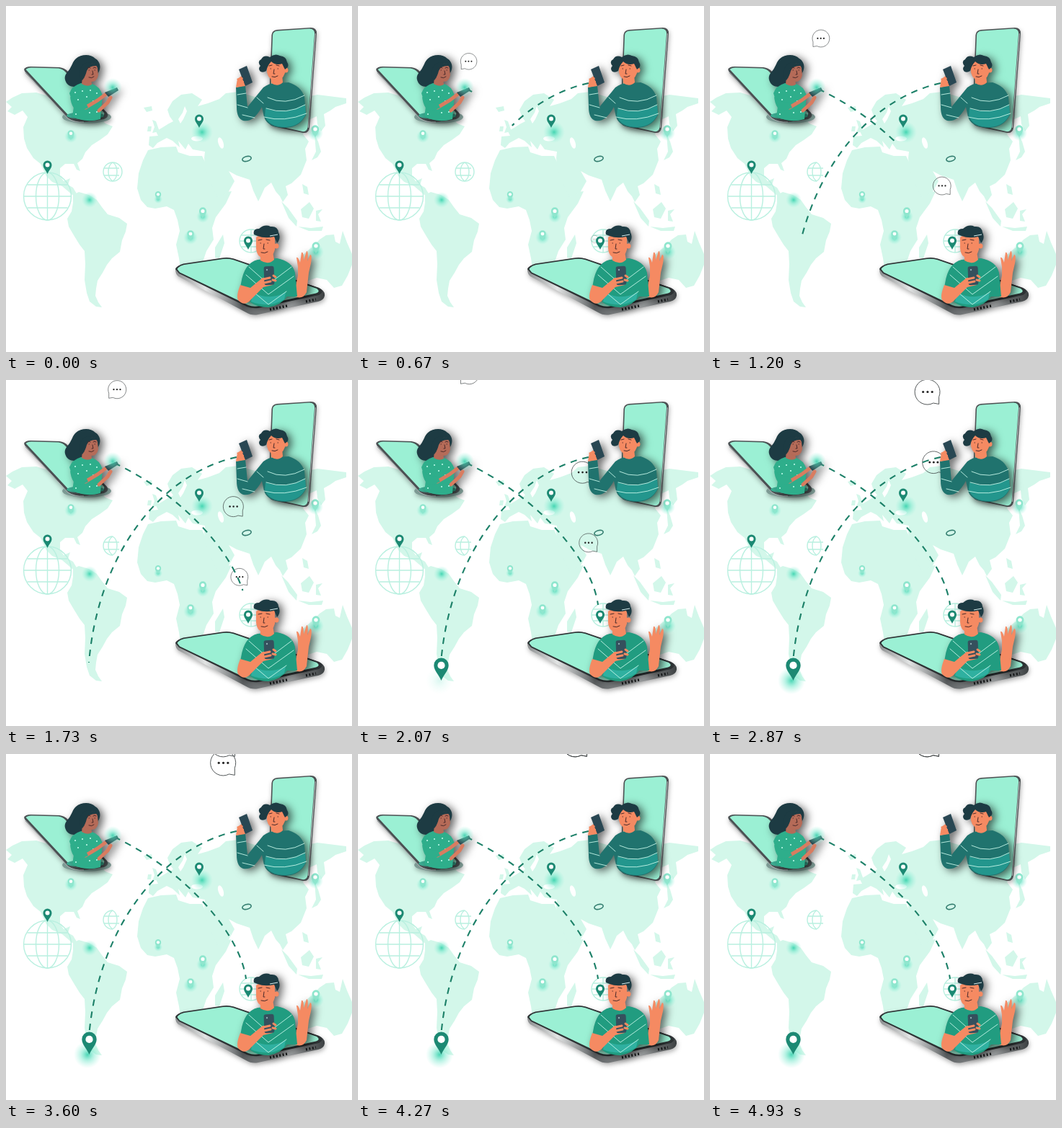
An HTML page that plays this animation: 480x480 px, repeating every 4.99 s.

```html
<!DOCTYPE html>
<html lang="en">
<head>
<meta charset="utf-8">
<title>Messages across the map</title>
<style>
html, body { margin: 0; width: 100%; height: 100%; overflow: hidden; background: #fff; }
svg { display: block; width: 100vw; height: 100vh; }
.land { fill: #d3f7ea; }
.globe { fill: none; stroke: #b9f0e0; stroke-width: 1.4; }
.dash { fill: none; stroke: #1c8068; stroke-width: 2.1; stroke-dasharray: 9 8; }
.wipe { fill: none; stroke: #fff; stroke-width: 8; stroke-dasharray: 1 1; }
.shade { filter: drop-shadow(5px 3px 6px rgba(0, 0, 0, .6)); }
.soft { filter: drop-shadow(1px 3px 3px rgba(0, 0, 0, .3)); }
.screen { fill: #9bf0d4; }
.hair { fill: #1d3b43; }
.skin { fill: #f58a62; }
.tan { fill: #b56b58; }
.line { fill: none; stroke: #c5f5e8; stroke-width: .9; stroke-linecap: round; }
.face { fill: none; stroke: #4a2a2a; stroke-width: 1; stroke-linecap: round; }
.bubble { fill: none; stroke: #3a3f40; stroke-width: .05; }
.bubble .dots { fill: #222; stroke: none; }
</style>
</head>
<body>
<svg viewBox="0 0 480 480">
<defs>
  <radialGradient id="glowFill">
    <stop offset="0" stop-color="#2bcfa8" stop-opacity=".85"/>
    <stop offset=".45" stop-color="#5fe3c3" stop-opacity=".45"/>
    <stop offset="1" stop-color="#8df0d8" stop-opacity="0"/>
  </radialGradient>
  <linearGradient id="metal">
    <stop offset="0" stop-color="#8c8f90"/><stop offset=".2" stop-color="#e2e4e4"/>
    <stop offset=".45" stop-color="#5d6163"/><stop offset=".75" stop-color="#a5a8a9"/>
    <stop offset="1" stop-color="#3b3f41"/>
  </linearGradient>
  <circle id="glow" r="10" fill="url(#glowFill)"/>
  <g id="pin">
    <path d="M0 0C-2-5-6-8-6-12.5A6 6 0 0 1 6-12.5C6-8 2-5 0 0Z"/>
    <circle cy="-12.4" r="3" fill="#fff"/>
  </g>
  <path id="eastPath" pathLength="1" d="M150 115C250 162 325 250 333 312"/>
  <path id="southPath" pathLength="1" d="M320 107C215 130 128 240 115 392"/>
  <mask id="eastMask" maskUnits="userSpaceOnUse" x="0" y="0" width="480" height="480">
    <use id="eastWipe" class="wipe" href="#eastPath"/>
  </mask>
  <mask id="southMask" maskUnits="userSpaceOnUse" x="0" y="0" width="480" height="480">
    <use id="southWipe" class="wipe" href="#southPath"/>
  </mask>
</defs>

<g class="land">
  <path d="M0 133L9 127 22 121 42 120 62 126 90 132 125 150 138 163 148 167 141 178 130 186 119 193 110 203 106 212 99 218 103 229 98 227 94 219 82 219 75 225 75 236 80 243 89 239 86 248 93 252 99 262 92 262 78 250 64 244 56 236 48 219 38 211 29 197 25 184 24 168 30 154 23 145 12 151 2 146 8 140Z"/>
  <path d="M93 262L101 258 115 262 126 269 133 279 141 289 157 294 168 302 166 313 161 325 158 341 147 350 140 359 134 370 127 381 125 392 124 402 128 411 133 418 125 417 116 410 112 398 109 380 110 358 109 340 102 331 94 318 87 306 85 295 91 285 93 273Z"/>
  <path d="M197 200L215 196 236 195 239 203 255 208 272 208 279 222 288 244 297 259 313 257 305 274 291 293 286 308 288 324 278 340 273 355 263 372 250 378 243 372 240 350 236 331 241 312 238 297 233 283 223 278 207 281 196 279 187 269 182 253 184 232 190 214Z"/>
  <path d="M301 317L303 329 296 350 290 349 290 335Z"/>
  <path d="M198 193L199 181 211 180 208 174 218 168 226 163 232 160 227 153 224 144 231 132 243 123 258 121 272 130 266 139 280 135 296 129 305 121 322 119 345 126 366 130 400 130 432 123 472 128 472 135 457 140 450 145 441 150 443 166 437 174 432 164 431 153 420 158 416 170 412 178 420 188 415 198 417 214 409 234 396 246 388 250 391 262 384 272 380 264 374 257 368 245 359 252 354 263 350 271 343 256 338 241 320 235 309 229 317 243 308 259 293 265 285 247 277 228 275 211 276 202 259 199 253 191 249 199 239 187 241 196 231 187 223 183 210 190 204 197Z"/>
  <path d="M203 158L208 160 213 174 203 176 206 168ZM197 167L202 167 201 174 196 174ZM191 141L202 139 203 145 195 147Z"/>
  <path d="M428 178L433 188 437 202 432 210 424 214 430 202ZM411 247L418 251 420 262 413 260Z"/>
  <path d="M382 271L391 280 404 298 403 306 392 294ZM409 282L421 272 427 281 420 295 411 293ZM430 284L439 282 433 289 437 299 430 298ZM405 306L423 308 440 306 438 312 420 312Z"/>
  <path d="M411 346L424 335 435 324 444 318 455 317 457 327 463 330 467 312 473 328 480 344 480 359 474 374 466 388 455 391 445 380 431 377 416 382Z"/>
</g>
<g fill="#fff">
  <ellipse cx="265" cy="184" rx="8" ry="3.5"/>
  <ellipse cx="298" cy="190" rx="3.5" ry="8" transform="rotate(-18 298 190)"/>
  <path d="M239 157L245 148 248 139 251 146 246 157 242 163Z"/>
</g>

<g class="globe">
  <g transform="translate(57.5 264)">
    <circle r="33"/>
    <ellipse rx="16" ry="33"/>
    <path d="M0-33V33M-33 0H33M-28-16H28M-28 16H28"/>
  </g>
  <g transform="translate(148 230)">
    <path d="M0-13A13 13 0 0 0 0 13M0-13C-8-8-8 8 0 13M0-13C8-8 8 8 0 13M-12-5H9M-12 5H9"/>
    <path id="rim" d="M0-13A13 13 0 0 1 0 13"/>
  </g>
  <g transform="translate(340 326)"><circle r="16"/><path d="M0-16V16M-16 0H16M-14-8H14M-14 8H14"/></g>
</g>
<ellipse cx="334" cy="212" rx="6.3" ry="3.4" transform="rotate(-14 334 212)" fill="#d3f7ea" stroke="#347e70" stroke-width="1.6"/>

<g id="glows"></g>
<g fill="#8fe6ce">
  <use href="#pin" transform="translate(90 186)scale(.75)"/>
  <use href="#pin" transform="translate(211 270)scale(.7)"/>
  <use href="#pin" transform="translate(273 295)scale(.85)"/>
  <use href="#pin" transform="translate(256 326)scale(.8)"/>
  <use href="#pin" transform="translate(429 182)scale(.9)"/>
  <use href="#pin" transform="translate(430 344)scale(.9)"/>
</g>
<g fill="#1c8973">
  <use href="#pin" x="57.5" y="233"/>
  <use href="#pin" x="268" y="169"/>
</g>

<g id="bubbles"></g>
<g mask="url(#eastMask)"><path id="east" class="dash" d="M150 115C250 162 325 250 333 312"/></g>
<g mask="url(#southMask)"><path id="south" class="dash" d="M320 107C215 130 128 240 115 392"/></g>
<use href="#pin" x="336" y="338" fill="#1c8973"/>
<g id="drop" fill="#1c8973">
  <use id="dropGlow" href="#glow" transform="translate(113 417)scale(1.9)"/>
  <use id="dropPin" href="#pin"/>
</g>

<!-- woman, upper left -->
<g class="soft">
  <ellipse cx="112" cy="154" rx="34" ry="9" fill="#7d9a94"/>
  <path fill="#4a5153" d="M25 88Q27 84 34 84L74 85Q81 86 85 90L140 148Q144 154 136 157L108 161Q95 162 86 156L27 93Z"/>
  <path class="screen" d="M27.500 88Q30 85.500 35 85.500L73 86.500Q79 87.500 82 91L136 148Q138 152 130 153L106 157Q95 157 87 152Z"/>
  <path d="M26 91L86 156Q95 162 108 161" fill="none" stroke="#b9bdbe" stroke-width="1"/>
  <ellipse cx="110" cy="152" rx="26" ry="5" fill="#3cac92"/>
</g>
<g class="shade">
  <path class="hair" d="M83 105C79 97 85 92 88 88C92 82 92 78 97 73C104 67 117 66 124 73C132 78 132 88 127 94L110 100 109 106C102 113 87 115 83 105Z"/>
  <path fill="#2eae8b" d="M88 121Q91 111 104 107L119 108Q130 111 134 124L131 157Q110 163 92 153L94 140Z"/>
  <path class="tan" d="M106 99L118 101 119 109Q113 113 105 108Z"/>
  <path class="tan" d="M107 86C109 77 124 77 127 86L128 96Q126 105 119 105Q108 104 107 95Z"/>
  <path class="hair" d="M103 100C100 80 112 73 127 83Q115 82 112 90Q110 98 106 103Z"/>
  <path class="face" d="M115 89h.5M123 89h.5M120 90l1 5h-2M115 99q4 2 7-1M113 86q2-2 4 0M121 86q2-2 4 0"/>
  <g fill="#c9fff0">
    <circle cx="96" cy="120" r="1"/><circle cx="106" cy="118" r="1"/><circle cx="117" cy="117" r="1"/><circle cx="126" cy="121" r="1"/>
    <circle cx="100" cy="130" r="1"/><circle cx="112" cy="126" r="1"/><circle cx="121" cy="132" r="1"/><circle cx="105" cy="141" r="1"/>
    <circle cx="97" cy="150" r="1"/><circle cx="116" cy="148" r="1"/><circle cx="126" cy="147" r="1"/>
  </g>
  <path d="M110 141L127 131 139 122" fill="none" stroke="#d97c60" stroke-width="5" stroke-linecap="round"/>
  <path d="M129 145L141 134 145 127" fill="none" stroke="#d97c60" stroke-width="5" stroke-linecap="round"/>
  <path d="M89 126Q91 145 103 146L114 141 110 133 101 134" fill="#2eae8b"/>
  <path fill="#29464d" d="M137 120L154 113 156 117 142 126Z"/>
</g>
<use href="#glow" transform="translate(148 113)scale(1.3)"/>

<!-- man, upper right -->
<g class="soft">
  <path fill="#4b5052" d="M368.500 40Q369 34 376 33L423 30Q431 30 431 38L421 169Q420 177 412 176L371 167Q364 165 364 158Z"/>
  <path d="M429.300 38L419.300 169" stroke="#bfc3c4" stroke-width="1"/>
  <path class="screen" d="M370 41Q370 35 377 34.500L421 31.500Q428.500 31.500 428 39L418.500 168Q417.500 175 411 174L372 165.500Q365.500 164 365.500 157Z"/>
</g>
<g class="shade">
  <path fill="#20736e" d="M319 113L332 110 335 140 357 113Q366 106 376 107L392 106Q409 111 414 126L416 151Q408 168 388 169Q363 169 358 154L355 140Q343 162 329 159Q320 156 320 140Z"/>
  <path fill="#23968d" d="M360 142Q386 152 415 137L416 150Q408 167 388 168Q364 168 359 152Z"/>
  <path class="line" d="M321 123l12-2M321 137l14 4M328 151l17 4M348 127l9 8M363 127Q387 139 414 124M361 142Q389 152 415 137M358 154Q386 162 417 149"/>
  <path class="skin" d="M367 96L383 95 384 106Q377 113 368 107Z"/>
  <path class="skin" d="M362 79Q373 71 385 80L387 93Q383 104 374 104Q364 102 362 92Z"/>
  <circle class="skin" cx="388" cy="89" r="3.500"/>
  <path class="hair" d="M353 91Q349 87 353 83Q348 77 354 74Q358 67 366 71Q373 65 380 69Q389 70 390 78Q394 84 387 88L383 80Q374 83 368 77Q363 82 361 90Q357 93 353 91Z"/>
  <path class="face" d="M367 87h.5M377 87h.5M372 88l-1 6h2M369 98q4 2 8-1M365 83l4-1M375 82l4 1"/>
  <path class="skin" d="M319 113L321 101 327 97 334 104 332 111Z"/>
  <path fill="#294753" d="M323 88L334 83 342 106 332 111Z"/>
  <path class="skin" d="M320 101l8-2 1 2-7 3M321 106l9-2v2l-8 3"/>
</g>

<!-- man, bottom -->
<g class="soft">
  <path fill="url(#metal)" d="M235 365Q236 361 246 358L300 350Q308 348 316 351L434 391Q443 395 442 402Q441 408 433 410L350 428Q341 430 333 425L239 375Q235 372 235 365Z"/>
  <path fill="#2d3234" d="M235 365Q237 360 246 357.500L300 349.500Q308 348 316 350.500L434 391Q443 396 434 401L350 419Q341 420 334 417L240 371Z"/>
  <path class="screen" d="M237.500 365Q239 361.500 247 359L301 351Q308 350 315 352L431 392Q437 396 430 398.500L349 416.500Q342 417.500 336 415L241 369.500Z"/>
  <path d="M366 421l24-5M416 410l14-3" stroke="#17191a" stroke-width="3.500" stroke-dasharray="2 2.5"/>
</g>
<g class="shade">
  <path class="skin" d="M399 402L405 374 405 362 403 349Q405 347 408 356L410 342Q413 340 413 353L417 340Q420 340 418 354L422 345Q425 345 423 357L420 370 417 397Q411 409 399 402Z"/>
  <path fill="#219c80" d="M326 385Q330 357 349 352L376 350Q397 354 401 370L404 403 390 403Q382 415 364 418Q348 418 339 411L340 398 324 395Z"/>
  <path fill="#2fb0a0" d="M343 398Q367 409 388 397L386 407Q365 420 340 410Z"/>
  <path class="line" d="M337 362L364 386 396 362M333 373L364 400 399 375M339 393L364 414 389 396"/>
  <path class="skin" d="M353 343L370 341 372 352Q364 360 353 353Z"/>
  <path class="skin" d="M347 321Q358 312 373 320L373 338Q370 350 360 350Q348 350 347 336Z"/>
  <circle class="skin" cx="375" cy="333" r="3.500"/>
  <path class="hair" d="M344 317Q342 309 351 309Q359 302 367 306Q377 305 378 314Q382 322 376 329L372 320Q359 323 349 319Z"/>
  <path d="M366 319l11-2" stroke="#d7eeee" stroke-width="1"/>
  <path class="face" d="M353 329h.5M363 329h.5M358 330l-1 7h2M354 342q5 2 9-1M350 325l5-1M361 324l5 1"/>
  <path class="skin" d="M325 387L339 391 356 377 368 378 370 387 357 390 340 407Q331 418 322 408Q319 402 325 387Z"/>
  <rect x="358" y="361" width="14" height="26" rx="3" fill="#35505d" transform="rotate(-2 365 374)"/>
  <circle cx="362" cy="366" r="1.2" fill="#8babb3"/>
  <path d="M357 379l9-2M358 384l9-2M371 374l3 2M370 380l4 1" stroke="#f58a62" stroke-width="3" stroke-linecap="round"/>
</g>
</svg>
<script>
const LOOP = 4990;
const NS = 'http://www.w3.org/2000/svg';
const byId = id => document.getElementById(id);
const ramp = (t, from, to) => Math.min(1, Math.max(0, (t - from) / (to - from)));

// x, y, scale
const glows = [
  [116, 269, 1.1], [272, 175, 1.5], [90, 181, .9], [211, 268, .6],
  [273, 292, .9], [256, 321, 1], [429, 176, 1.1], [430, 341, 1.1]
];
for (const [x, y, size] of glows) {
  const glow = document.createElementNS(NS, 'use');
  glow.setAttribute('href', '#glow');
  glow.setAttribute('transform', `translate(${x} ${y})scale(${size})`);
  byId('glows').append(glow);
}

// Unit-radius bubble; side is -1 for a tail on the left, 1 on the right
function makeBubble(side) {
  const g = document.createElementNS(NS, 'g');
  g.setAttribute('class', 'bubble');
  g.innerHTML = `<path transform="scale(${side} 1)" d="M.9 .4A1 1 0 1 0 .45 .89L.9 .97Z"/>
    <g class="dots"><circle cx="-.36" r=".09"/><circle r=".09"/><circle cx=".36" r=".09"/></g>`;
  byId('bubbles').append(g);
  return (x, y, r) => g.setAttribute('transform', `translate(${x} ${y})scale(${r})`);
}
const placeLeft = makeBubble(-1);
const placeRight = [makeBubble(1), makeBubble(1)];

function reveal(id, amount) {
  byId(id).style.strokeDashoffset = 1 - amount;
}

function show(id, visible) {
  byId(id).style.display = visible ? '' : 'none';
}

function draw(t) {
  placeLeft(153 + t / 1800, 117 - .06 * t, ramp(t, 40, 450) * (10.5 + t / 850));

  // Both right bubbles follow one path and come to rest on the top edge
  placeRight.forEach((place, i) => {
    const age = t - 700 * i;
    const y = Math.max(417 - .1395 * age, -14);
    const x = 301.5 + Math.max(0, y - 12) * .0863;
    place(x, y, ramp(age, 550, 800) * (17.8 - .0215 * Math.max(0, y)));
  });

  reveal('eastWipe', ramp(t, 620, 1820));
  reveal('southWipe', ramp(t, 300, 1430));
  show('east', t > 620);
  show('south', t > 300 && t < 4925);
  show('rim', t < 950);

  const size = 1.7 * ramp(t, 1750, 2070);
  byId('dropPin').setAttribute('transform', `translate(115.500 417)scale(${size})`);
  byId('dropGlow').style.opacity = ramp(t, 2000, 2350);
}

const start = performance.now();
function tick() {
  draw((performance.now() - start) % LOOP);
  requestAnimationFrame(tick);
}
tick();
</script>
</body>
</html>
```
